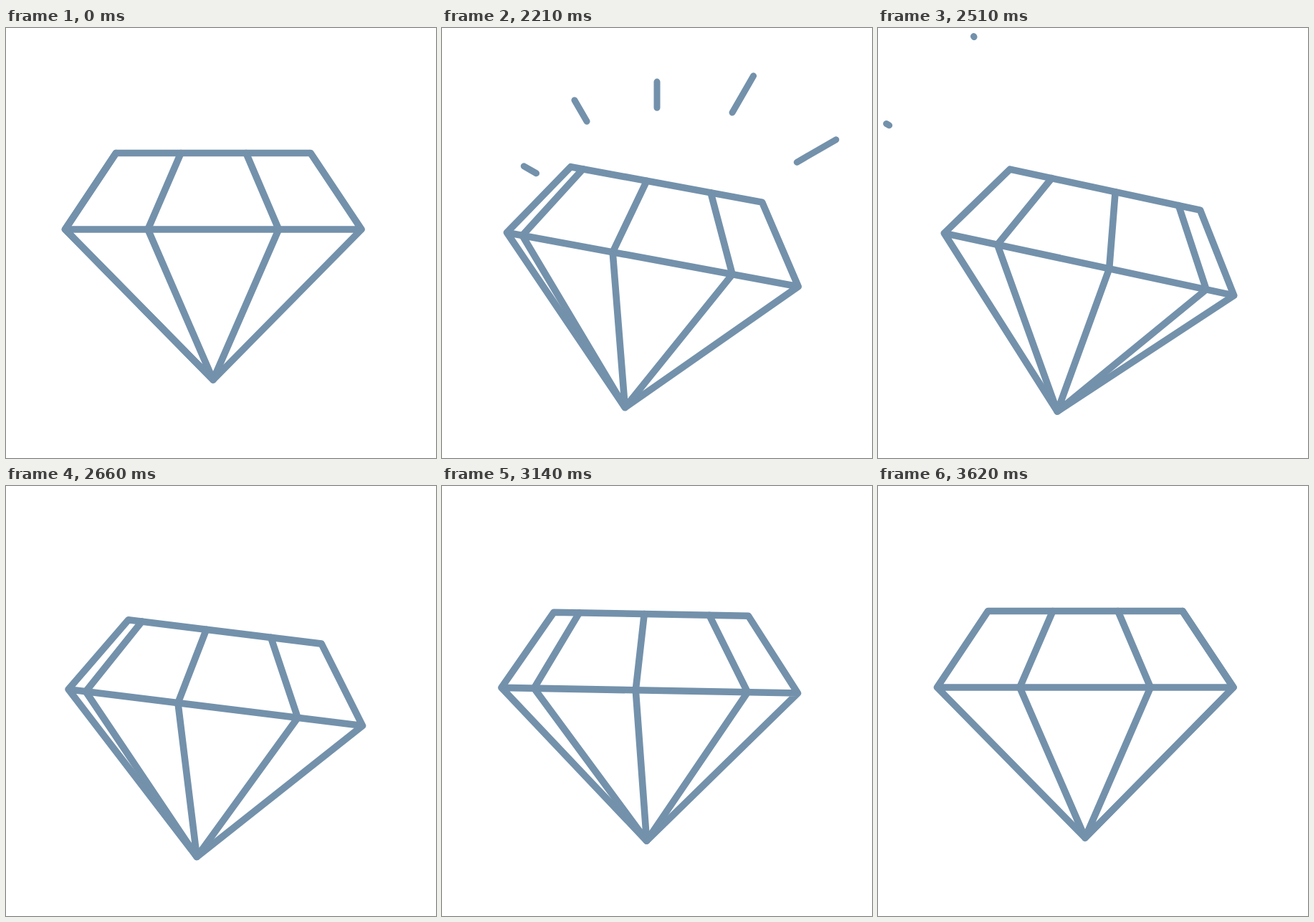
An HTML page that plays this animation: 600 by 600 pixels, repeating every 3650 ms.

```html
<!DOCTYPE html>
<html lang="en">
<head>
<meta charset="utf-8">
<title>Diamond</title>
<style>
html, body { margin: 0; width: 100%; height: 100%; overflow: hidden; background: #fff; }
svg { display: block; width: 100%; height: 100%; }
path { fill: none; stroke: #7391ab; stroke-width: 9.6; stroke-linecap: round; stroke-linejoin: round; }
</style>
</head>
<body>
<svg viewBox="0 0 600 600">
  <path id="rays" style="stroke-width:9"/>
  <g id="gem">
    <path d="M153.5 174.5H425L496 281L289 491L82.5 281ZM82.5 281H496"/>
    <path id="facets"/>
  </g>
</svg>
<script>
const LOOP = 3650, START = 2000, STEP = 30;
const TOP = [153.5, 244, 335, 425];
const GIRDLE = [82.5, 198, 380.5, 496];
// angle in degrees, inner and outer radius, in order of appearance
const RAYS = [[-30, 194.5, 333], [-60, 194.5, 333], [-90, 184, 288], [-120, 194.5, 333], [-150, 194.5, 333]];
const el = id => document.getElementById(id);
const rays = el('rays'), gem = el('gem'), facets = el('facets');
const mix = (a, b, p) => a + (b - a) * p;

// cubic-bezier(x1, 0, x2, 1) run from time a to time b
function ease(k, a, b, x1, x2) {
  const u = (k - a) / (b - a);
  if (u <= 0) return 0;
  if (u >= 1) return 1;
  let lo = 0, hi = 1;
  for (let i = 0; i < 30; i++) {
    const m = (lo + hi) / 2, n = 1 - m;
    if (3 * n * n * m * x1 + 3 * n * m * m * x2 + m * m * m < u) lo = m;
    else hi = m;
  }
  return lo * lo * (3 - 2 * lo);
}

function facetPath(p) {
  let d = '';
  for (let i = 0; i < 3; i++) {
    const top = mix(TOP[i], TOP[i + 1], p);
    const mid = mix(GIRDLE[i], GIRDLE[i + 1], p);
    d += `M${top} 174.5L${mid} 281L289 491`;
  }
  return d;
}

function rayPath(k) {
  return RAYS.map(([deg, r0, r1], i) => {
    const tail = ease(k - i, 2, 14, 0.5, 0.43);
    const head = ease(k - i, -1, 11, 0.4, 0.54);
    if (head <= 0 || tail >= 1) return '';
    const a = deg * Math.PI / 180;
    const at = p => {
      const r = mix(r0, r1, p);
      return `${300 + r * Math.cos(a)} ${300 + r * Math.sin(a)}`;
    };
    return `M${at(tail)}L${at(head)}`;
  }).join('');
}

function draw(t) {
  const k = Math.max(-1, Math.floor((t - START) / STEP) - 1);
  const tilt = k < 10 ? ease(k, -1, 10, 1 / 3, 2 / 3) : 1 - ease(k, 10, 53, 0.24, 0.075);
  const spin = 7 * ease(k, -1, 54, 0.496, 0.28);
  // slides in a straight line while turning about its own middle
  gem.setAttribute('transform', `translate(${-7 * tilt} ${58.9 * tilt}) rotate(${15 * tilt} 289 333)`);
  facets.setAttribute('d', facetPath(spin % 1));
  rays.setAttribute('d', rayPath(k));
}

const began = performance.now();
function tick() {
  draw((performance.now() - began) % LOOP);
  requestAnimationFrame(tick);
}
tick();
</script>
</body>
</html>
```
